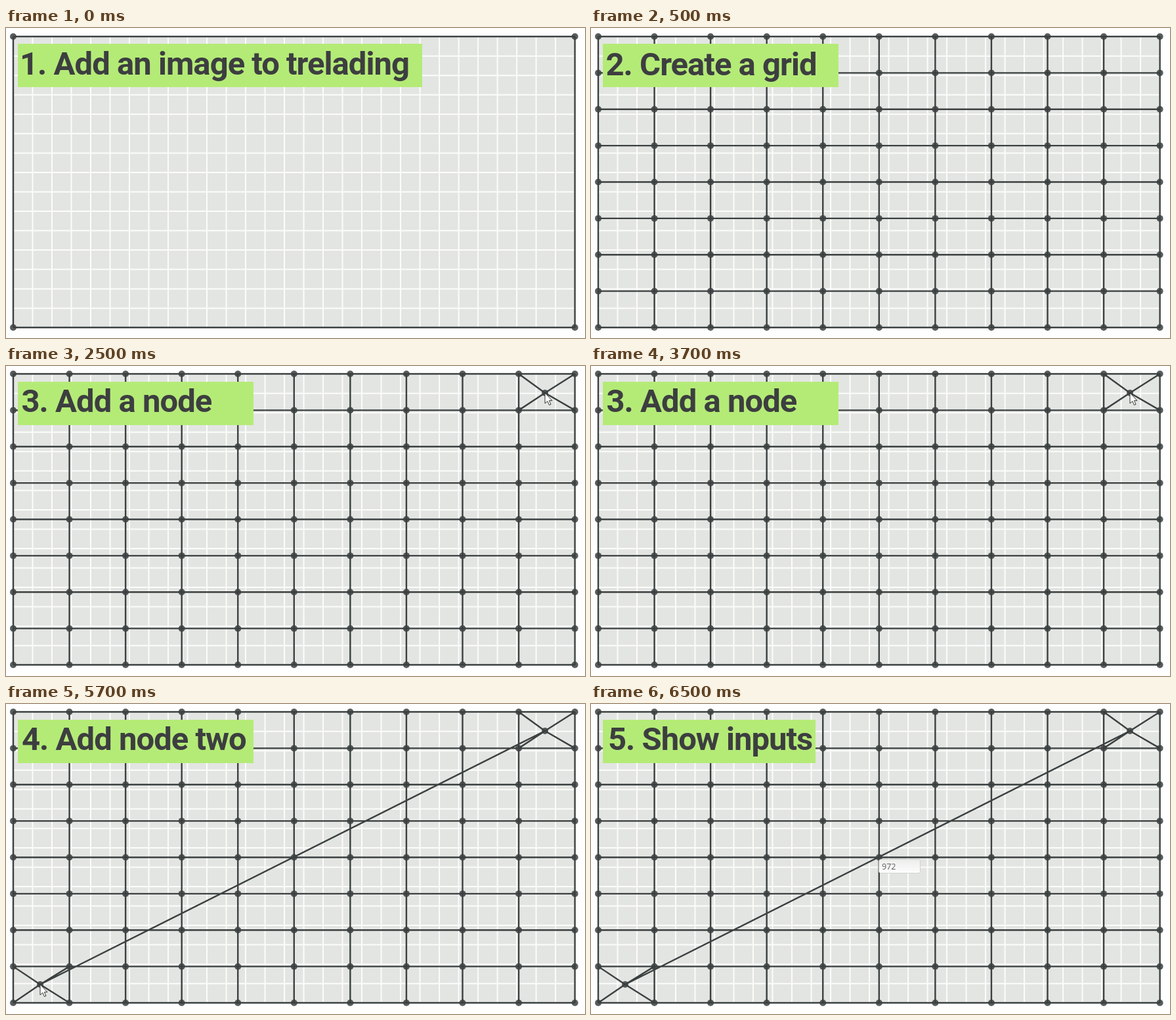
These frames come from a looping animation (882 by 472 pixels, 8 s). An HTML page:

```html
<!DOCTYPE html>
<html>
<head>
<meta charset="utf-8">
<style>
  html, body { margin: 0; width: 100%; height: 100%; overflow: hidden; background: #fefefe; }
  svg { display: block; }
  .mesh { fill: none; stroke: #3b4040; stroke-width: 2.4; }
  .paper { fill: none; stroke: #fcfdfb; stroke-width: 2; }
  .nodes { fill: #3b4040; fill-opacity: .85; }
  .title { font: 600 49px Roboto, "Liberation Sans", sans-serif; letter-spacing: -1px; fill: #3d3e40; }
  .value { font: 12.5px "Open Sans", "Noto Sans", sans-serif; fill: #5c5e5c; }
</style>
</head>
<body>
<svg width="882" height="472" viewBox="0 0 882 472">
  <defs>
    <linearGradient id="field" x2="0" y2="1">
      <stop offset="0" stop-color="#eceeeb"/>
      <stop offset="1" stop-color="#fdfdfd"/>
    </linearGradient>
  </defs>
  <g id="stage"></g>
</svg>
<script>
const LEFT = 11, WIDTH = 855.6, HEIGHT = 443, LOOP = 8000;
const A = [821, 41], B = [52, 427];

const scenes = [
  { at: 0, top: 13, cols: 1, rows: 1, title: '1. Add an image to trelading', x: 21, base: 71, box: 616 },
  { at: 500, top: 13, title: '2. Create a grid', x: 22.5, base: 72, box: 359 },
  { at: 2500, title: '3. Add a node', x: 23.5, box: 359, count: 1, cursor: A },
  { at: 4500, title: '4. Add node two', x: 24, box: 359, count: 2, cursor: B },
  { at: 6500, title: '5. Show inputs', x: 26, box: 324, count: 2, input: '972' }
];

const range = n => Array.from({ length: n + 1 }, (_, i) => i);
const dot = (x, y, r = 5) => `<circle cx="${x}" cy="${y}" r="${r}"/>`;

function gridPath(cols, rows, top) {
  return range(cols).map(i => `M${LEFT + i * WIDTH / cols} ${top}v${HEIGHT}`).join('') +
    range(rows).map(j => `M${LEFT} ${top + j * HEIGHT / rows}h${WIDTH}`).join('');
}

// Joins a point to the four corners of the cell around it.
function spokes([x, y], cols, rows, top) {
  const w = WIDTH / cols, h = HEIGHT / rows;
  const col = Math.floor((x - LEFT) / w), row = Math.floor((y - top) / h);
  return [0, 1].flatMap(i => [0, 1].map(j =>
    `M${x} ${y}L${LEFT + (col + i) * w} ${top + (row + j) * h}`)).join('');
}

function draw({ top = 12, cols = 10, rows = 8, title, x, base = 70, box, count = 0, cursor, input }) {
  const added = [A, B].slice(0, count);
  let mesh = gridPath(cols, rows, top) + added.map(p => spokes(p, cols, rows, top)).join('');
  if (count === 2) mesh += `M${A}L${B}`;
  const nodes = range(cols).flatMap(i => range(rows).map(j =>
    dot(LEFT + i * WIDTH / cols, top + j * HEIGHT / rows))).join('');

  return `<rect x="${LEFT}" y="${top}" width="${WIDTH}" height="${HEIGHT}" fill="#e3e5e2"/>
    <path class="paper" d="${gridPath(29, 15, top + .2)}"/>
    <path class="mesh" d="${mesh}"/>
    <g class="nodes">${nodes}${added.map(p => dot(...p)).join('')}</g>
    <rect x="18" y="24" width="${box}" height="66" fill="#b4eb77"/>
    <text class="title" x="${x}" y="${base}">${title}</text>` +
    (cursor ? `<path transform="translate(${cursor})" d="M0 0V16L3.8 12.5L6.5 18.5L9 17.3L6.4 11.7H11Z"
      fill="#fff" stroke="#333"/>` : '') +
    (input ? `<rect x="438.5" y="236.5" width="63" height="21" rx="3" fill="url(#field)"
      stroke="#b4b6b3" stroke-dasharray="1 1"/>
      <text class="value" x="443" y="252">${input}</text>` : '');
}

const stage = document.getElementById('stage');
let shown;

function frame() {
  const t = performance.now() % LOOP;
  const scene = scenes.filter(s => s.at <= t).pop();
  if (scene !== shown) stage.innerHTML = draw(shown = scene);
  requestAnimationFrame(frame);
}
frame();
</script>
</body>
</html>
```
